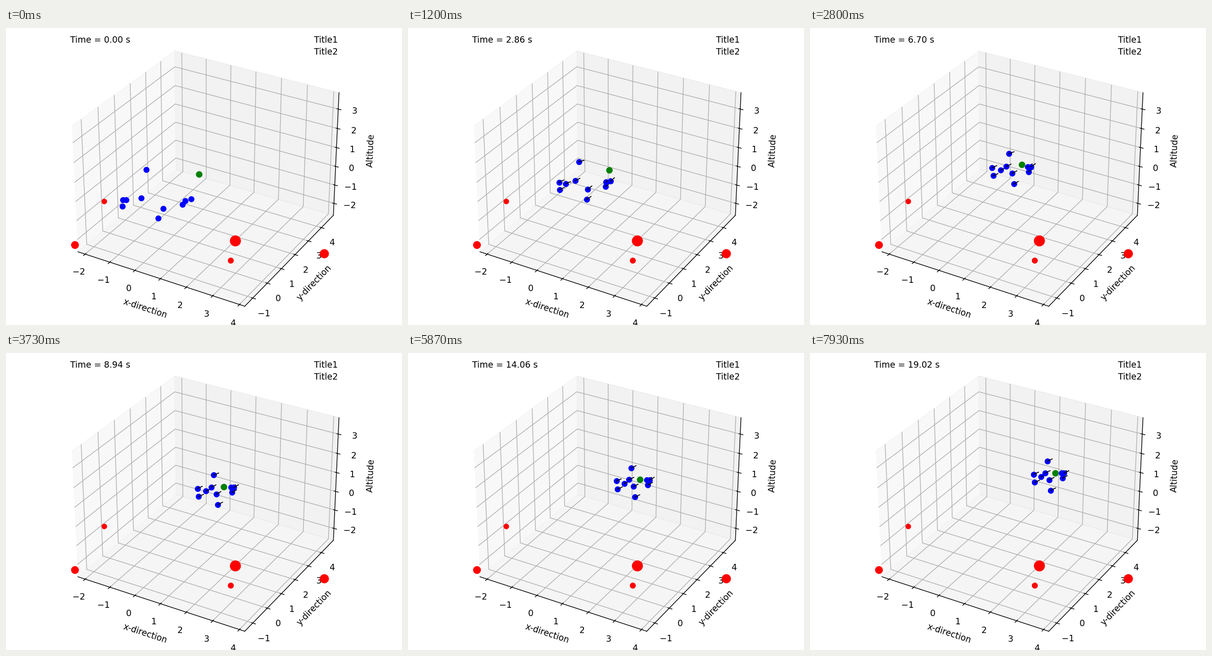
Recreate the animation shown at these times as a matplotlib script. Size 864 px wide and 648 px high, loop 8 s.

```python
import numpy as np
import matplotlib.pyplot as plt
from matplotlib.animation import FuncAnimation

W, H, DPI = 864, 648, 135
FRAMES, INTERVAL = 120, 66.6
DT = 0.16         # simulated seconds per frame
T_END = 19.02
RATE = 0.654      # settling rate of the swarm, 1/s
SQUEEZE = 0.018   # slow narrowing of the formation, 1/s
ARROW = 11.4      # heading line length, px
HALF = 3.246      # half range of every axis

# Followers: start point and final slot relative to the leader, px
START = np.array([(255, 375), (262, 375), (253.5, 389), (294.5, 371),
                  (342.5, 394), (332, 415), (385, 385), (391, 376.5),
                  (404, 373), (305.5, 309)])
SLOT = np.array([(-47, 3), (-31, 8.5), (-44.6, 20.5), (-21.6, 0),
                 (-13, 15), (-9.6, 38), (16, 11.5), (14, 0.5),
                 (19.4, 0.5), (-17, -25.5)])
OBSTACLES = [(213.8, 378, 12), (150.3, 473, 17), (499.6, 464, 24),
             (490, 506.5, 13), (694, 492.3, 20)]


def leader(t):
    return np.array([421 + 6.16 * t - 0.0085 * t**2,
                     319 - 3.10 * t + 0.0042 * t**2])


def slots(t):
    return SLOT * [1 + SQUEEZE * (T_END - t), 1]


def followers(t):
    """Critically damped approach to the slots, starting at rest."""
    decay = np.exp(-RATE * t)
    gap = START - leader(0) - slots(0)
    lag = np.array([-6.1, 0]) * t * decay
    return leader(t) + slots(t) + gap * (1 + RATE * t) * decay + lag


fig = plt.figure(figsize=(W / DPI, H / DPI), dpi=DPI)

ax = fig.add_axes([0, 0, 1, 1], projection="3d")
ax.set_xlim(0.95 - HALF, 0.95 + HALF)
ax.set_ylim(1.706 - HALF, 1.706 + HALF)
ax.set_zlim(0.59 - HALF, 0.59 + HALF)
ax.set_xticks(range(-2, 5))
ax.set_yticks(range(-1, 5))
ax.set_zticks(range(-2, 4))
ax.set_xlabel("x-direction")
ax.set_ylabel("y-direction")
ax.set_zlabel("Altitude")
clock = ax.text2D(0.05, 0.95, "", transform=ax.transAxes)
ax.text2D(0.87, 0.95, "Title1", transform=ax.transAxes)
ax.text2D(0.87, 0.91, "Title2", transform=ax.transAxes)

# Flat layer in pixel coordinates, y down
stage = fig.add_axes([0, 0, 1, 1])
stage.set(xlim=(0, W), ylim=(H, 0))
stage.axis("off")


def dot(color, size, x=0, y=0):
    return stage.plot([x], [y], "o", color=color, markeredgewidth=0,
                      markersize=size * 72 / DPI)[0]


for x, y, size in OBSTACLES:
    dot("red", size, x, y)
guide = dot("green", 14.2)
birds = [(dot("blue", 13.1), stage.plot([], [], color="black", lw=1)[0])
         for _ in START]


def update(k):
    t = max(0.0, DT * k - 0.02)
    clock.set_text(f"Time = {t:.2f} s")
    guide.set_data(*leader(t)[:, None])
    spots = followers(t)
    steps = followers(t + 0.01) - followers(t - 0.01)
    reach = ARROW if k else 0
    for (body, heading), spot, step in zip(birds, spots, steps):
        body.set_data(*spot[:, None])
        tip = spot + reach * step / np.hypot(*step)
        heading.set_data(*np.stack([spot, tip], axis=1))
        heading.set_visible(k > 0)
    return []


update(0)
anim = FuncAnimation(fig, update, frames=FRAMES, interval=INTERVAL,
                     repeat=True, repeat_delay=0, blit=False)
plt.show()
```
